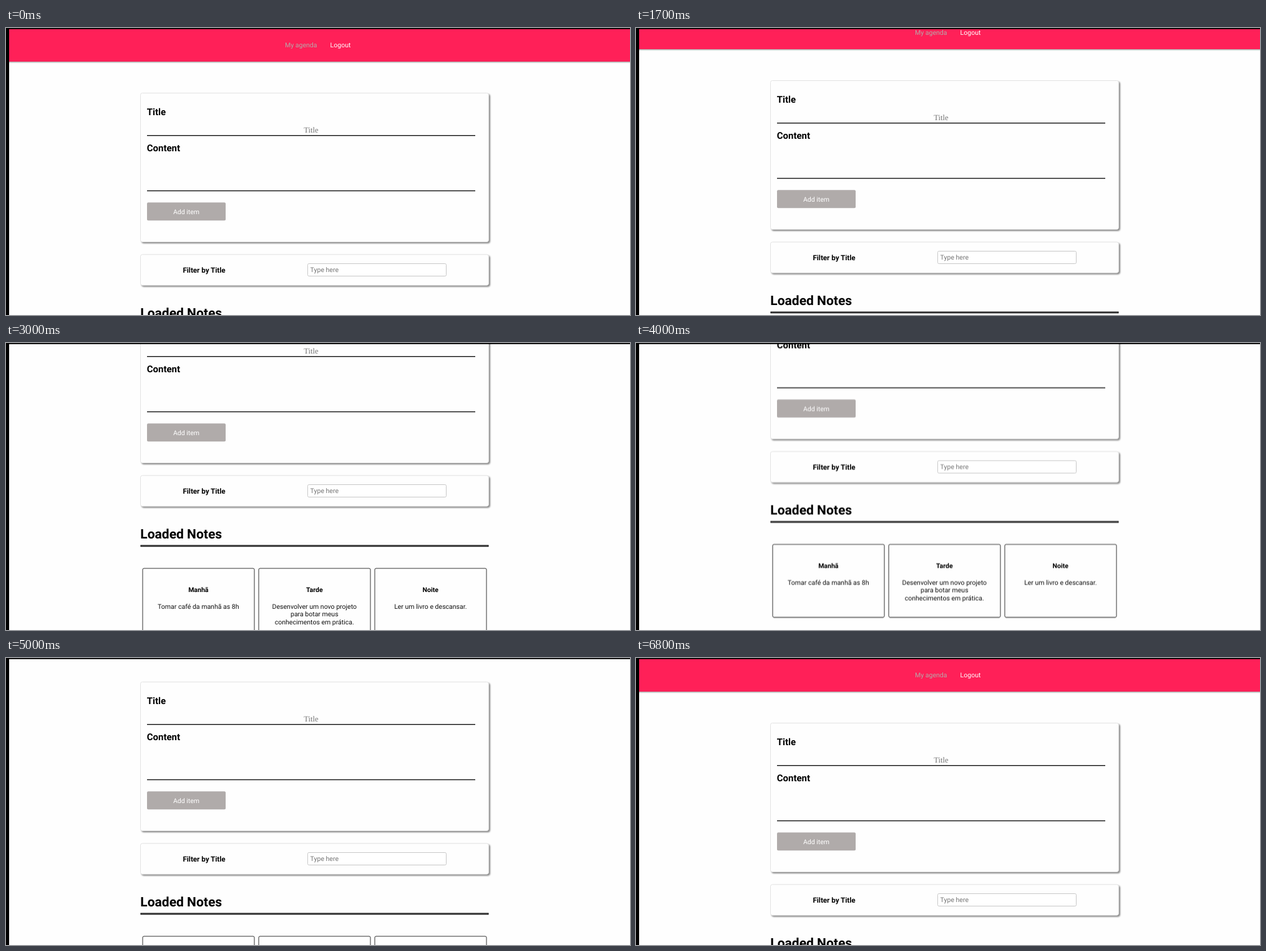
Write an HTML page that moves like this. It is 1000x461 px and loops after 6900 ms.

```html
<!DOCTYPE html>
<html lang="en">
<head>
<meta charset="utf-8">
<title>Agenda</title>
<style>
  html, body { margin: 0; width: 100%; height: 100%; overflow: hidden; background: #fefefe; }
  svg { display: block; width: 1000px; height: 461px; }
  text { font: 10.53px Roboto, sans-serif; fill: #111; text-rendering: geometricPrecision; }
  .mid { text-anchor: middle; }
  .bold, .head, .label { font-weight: 700; fill: #000; }
  .head { font-size: 21px; }
  .label { font-size: 15px; }
  .filter { font-size: 11.6px; }
  .hint { fill: #757575; }
  .serif { font-family: "Liberation Serif", serif; font-size: 12.6px; }
  .on-color { fill: #fff; }
  .active { fill: #b5a8a9; }
  .bar { fill: #ff2058; filter: drop-shadow(0 1.5px 1px rgba(0, 0, 0, .45)); }
  .panel { fill: #fefefe; stroke: #e2e2e2; filter: drop-shadow(2px 2px .8px #888); }
  .line { fill: #111; }
  .button { fill: #b0abaa; }
  .input { fill: #fff; stroke: #c8c8c8; }
  .note { fill: none; stroke: #333; }

  /* Each segment advances once every 100 ms */
  #page { animation: scroll 6900ms infinite; }
  @keyframes scroll {
    0%     { transform: translateY(0); animation-timing-function: step-end; }
    17.39% { transform: translateY(0); animation-timing-function: steps(5); }
    24.63% { transform: translateY(-20px); animation-timing-function: steps(6); }
    33.33% { transform: translateY(-41px); animation-timing-function: steps(2); }
    36.23% { transform: translateY(-57px); animation-timing-function: steps(2); }
    39.13% { transform: translateY(-90px); animation-timing-function: steps(3); }
    43.47% { transform: translateY(-151px); animation-timing-function: steps(2); }
    46.37% { transform: translateY(-189.5px); animation-timing-function: step-end; }
    62.31% { transform: translateY(-189.5px); animation-timing-function: steps(1); }
    63.76% { transform: translateY(-180px); animation-timing-function: steps(5); }
    71.01% { transform: translateY(-85px); animation-timing-function: steps(1); }
    72.46% { transform: translateY(-66px); animation-timing-function: steps(2); }
    75.36% { transform: translateY(-28px); animation-timing-function: steps(2); }
    78.26%, 100% { transform: translateY(0); animation-timing-function: step-end; }
  }
</style>
</head>
<body>
<svg viewBox="0 0 1000 461">
  <g id="page">
    <rect class="bar" x="0" y="-20" width="1010" height="74"/>
    <text class="active" x="447" y="30.6">My agenda</text>
    <text class="on-color" x="519.6" y="30.6">Logout</text>

    <rect class="panel" x="215.5" y="104.5" width="558" height="239" rx="3"/>
    <text class="label" x="225.7" y="140.3">Title</text>
    <text class="hint serif mid" x="489" y="168">Title</text>
    <rect class="line" x="226" y="172" width="526" height="1.4"/>
    <text class="label" x="225.7" y="198.3">Content</text>
    <rect class="line" x="226" y="260.8" width="526" height="1.4"/>
    <rect class="button" x="226" y="280.3" width="126" height="28.9" rx="2"/>
    <text class="on-color mid" x="289" y="298.5">Add item</text>

    <rect class="panel" x="215.5" y="363.9" width="558" height="49.3" rx="3"/>
    <text class="bold filter mid" x="317.5" y="392.6">Filter by Title</text>
    <rect class="input" x="483.5" y="378.5" width="222" height="20" rx="2"/>
    <text class="hint" x="487.6" y="392.2">Type here</text>

    <text class="head" x="215.3" y="465">Loaded Notes</text>
    <rect x="215.5" y="475.5" width="558" height="2.8"/>
    <rect x="216.5" y="476.5" width="556" height=".8" fill="#777"/>

    <rect class="note" x="219" y="513" width="179" height="117" rx="2"/>
    <text class="bold mid" x="308.3" y="550.8">Manhã</text>
    <text class="mid" x="308.3" y="577.6">Tomar café da manhã as 8h</text>

    <rect class="note" x="405" y="513" width="179" height="117" rx="2"/>
    <text class="bold mid" x="494.3" y="550.8">Tarde</text>
    <text class="mid" x="494.3" y="577.6">Desenvolver um novo projeto</text>
    <text class="mid" x="494.3" y="590.4">para botar meus</text>
    <text class="mid" x="494.3" y="603.2">conhecimentos em prática.</text>

    <rect class="note" x="591" y="513" width="179" height="117" rx="2"/>
    <text class="bold mid" x="680.3" y="550.8">Noite</text>
    <text class="mid" x="680.3" y="577.6">Ler um livro e descansar.</text>
  </g>
  <rect width="1000" height="1.8"/>
  <rect width="5" height="461"/>
</svg>
</body>
</html>
```
